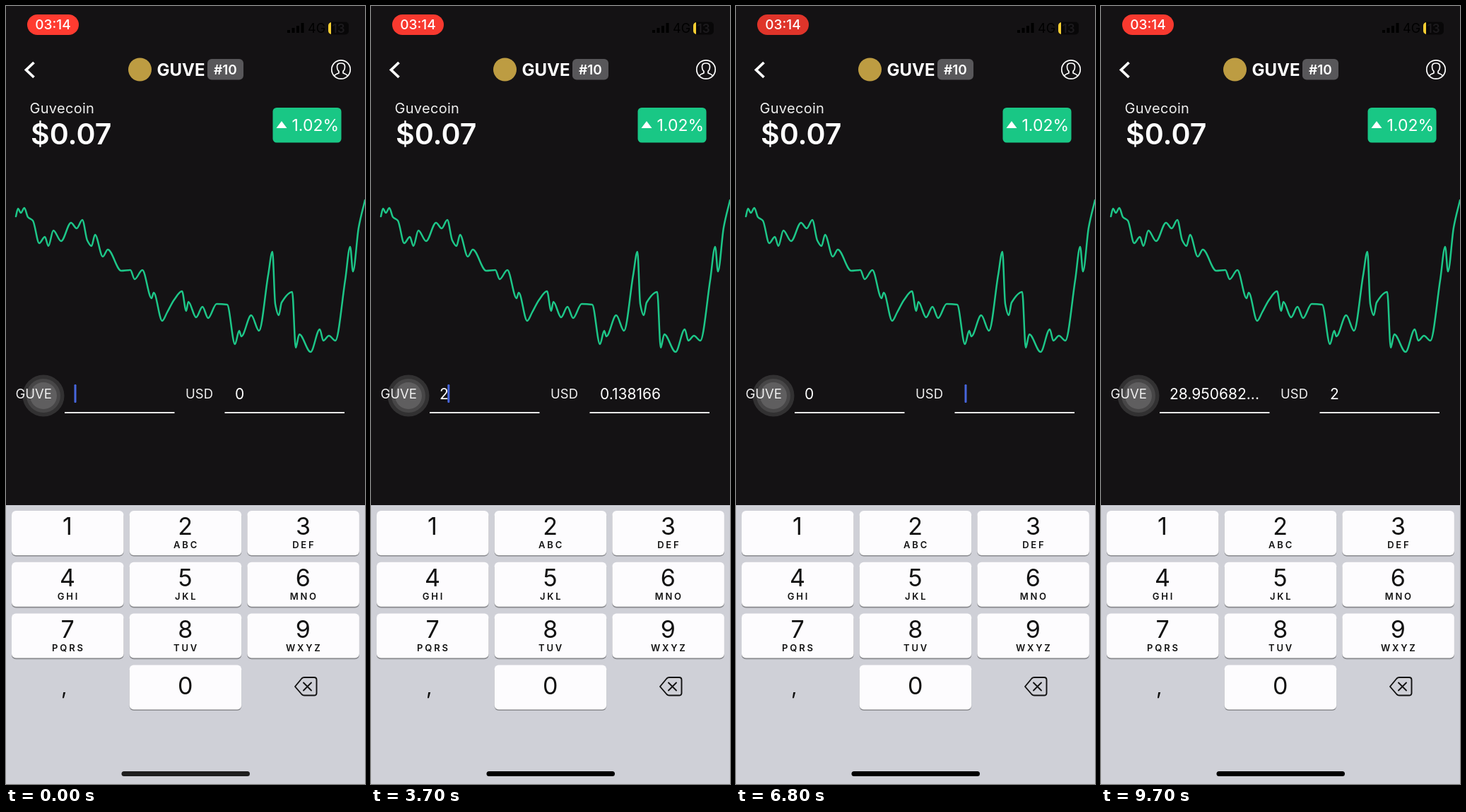
An HTML page that plays this animation: 508x1102 px, repeating every 9800 ms.

```html
<!DOCTYPE html>
<html lang="en">
<head>
<meta charset="utf-8">
<title>Coin converter</title>
<style>
  html, body { margin: 0; width: 100%; height: 100%; overflow: hidden; background: #141214; }
  svg { display: block; width: 100%; height: 100%; }
  text { font-family: Inter, Roboto, sans-serif; fill: #fff; white-space: pre; }
  .mid { text-anchor: middle; }
  .field { font-size: 21px; }
  .label { font-size: 18.5px; fill: #f0f0f0; }
  .digit { font-size: 34px; fill: #111; text-anchor: middle; }
  .letters { font-size: 13px; font-weight: 600; letter-spacing: 2.8px; fill: #111; text-anchor: middle; }
  .line { fill: none; stroke: #fff; stroke-linecap: round; stroke-linejoin: round; }
</style>
</head>
<body>
<svg viewBox="0 0 508 1102">
  <rect width="508" height="1102" fill="#141214"/>

  <g id="status">
    <rect id="pill" x="30" y="12" width="73" height="29" rx="14.5"/>
    <text class="mid" x="66.5" y="33.2" font-size="19" font-weight="500">03:14</text>
    <path d="M398 34h4v4h-4zM404.5 31h4v7h-4zM411 28h4v10h-4zM417.5 24h4v14h-4z" fill="#000"/>
    <text x="427" y="38" font-size="18" style="fill:#000">4G</text>
    <rect x="456" y="22.5" width="29" height="18" rx="5" fill="#080708"/>
    <path d="M460 23v17q-4-1-4-5v-7q0-4 4-5z" fill="#f6cf32"/>
    <text class="mid" x="470.5" y="38" font-size="17" font-weight="600" style="fill:#1c1a1d">13</text>
  </g>

  <g id="header">
    <path class="line" d="M39.5 80L28.5 90.5L39.5 101" stroke-width="3.8" style="stroke-linecap:butt;stroke-linejoin:miter"/>
    <circle cx="189.5" cy="90" r="16.5" fill="#bd9c42"/>
    <text x="213.5" y="98.5" font-size="24" font-weight="700">GUVE</text>
    <rect x="285" y="75" width="51" height="29.5" rx="6" fill="#58575a"/>
    <text class="mid" x="310.5" y="96.5" font-size="19" font-weight="600">#10</text>
    <g class="line" stroke-width="1.7">
      <circle cx="474" cy="90" r="13.2"/>
      <path d="M464.5 99q1-2 6.5-4v-2.5q-2.5-2-2.5-7q0-4.5 5.5-4.5t5.5 4.5q0 5-2.5 7v2.5q5.5 2 6.5 4"/>
    </g>
  </g>

  <g id="price">
    <text x="33.5" y="151.5" font-size="20" letter-spacing=".3" style="fill:#eee">Guvecoin</text>
    <text x="35" y="195.5" font-size="41" font-weight="600">$0.07</text>
    <rect x="377.5" y="144" width="97" height="49.5" rx="5.5" fill="#19c785"/>
    <path d="M382.5 173L390 163L397.5 173z" fill="#fff"/>
    <text x="404.5" y="177" font-size="23">1.02%</text>
  </g>

  <path id="chart" class="line" stroke-width="2.5" style="stroke:#1dc688"/>

  <g id="converter">
    <g fill="#fff">
      <circle cx="53" cy="552" r="29.5" opacity=".13"/>
      <circle cx="53" cy="552" r="24" opacity=".1"/>
      <circle cx="53" cy="552" r="19" opacity=".13"/>
    </g>
    <text class="label" x="13.5" y="556">GUVE</text>
    <text class="label" x="254" y="556">USD</text>
    <path d="M83 576H238.5M309.5 576H479" stroke="#e8e8e8" stroke-width="1.8"/>
    <text class="field" id="coin" x="97" y="557"></text>
    <text class="field" id="usd" x="324" y="557"></text>
    <rect id="caret" y="536" width="3" height="26" rx="1.2" fill="#4766dd"/>
  </g>

  <rect y="707" width="508" height="395" fill="#cfd0d7"/>
  <g id="keys"></g>
  <text x="78" y="975" font-size="30" style="fill:#111">,</text>
  <g stroke-width="1.9" stroke-linejoin="round" stroke-linecap="round">
    <path id="erase" d="M409 964L418.5 952.5Q420 951 422 951H436Q439.5 951 439.5 954.5V973Q439.5 976.5 436 976.5H422Q420 976.5 418.5 975Z" stroke="#111"/>
    <path id="eraseCross" d="M421 958.5l11 11m0-11l-11 11"/>
  </g>
  <rect id="home" x="163.5" y="1084" width="181.5" height="7" rx="3.5"/>
</svg>

<script>
const LOOP = 9800;
const $ = id => document.getElementById(id);

// Price curve: x, y of its main turning points
const prices = [
  14,298, 17,287, 21,293, 26,286, 31,299, 38,304, 47,336, 55,327, 60,340, 67,318,
  78,333, 92,307, 100,315, 108,303, 115,332, 121,340, 126,324, 137,355, 144,345, 163,375,
  176,374, 182,387, 193,374, 206,414, 209,406, 221,446, 228,434, 238,416, 249,404, 255,432,
  258,419, 269,441, 278,426, 286,442, 298,422, 313,423, 324,479, 330,460, 333,468, 347,438,
  358,460, 371,381, 377,348, 381,422, 386,438, 390,420, 405,405, 410,484, 415,465, 431,490,
  444,458, 449,474, 457,467, 466,474, 480,388, 487,341, 491,376, 499,314, 508,275
];

// Smooth curve that is level at every peak and valley
function monotonePath(flat) {
  const points = [];
  for (let i = 0; i < flat.length; i += 2) points.push([flat[i], flat[i + 1]]);
  const slopes = points.slice(1).map(([x, y], i) => (y - points[i][1]) / (x - points[i][0]));
  const tangents = points.map((_, i) => {
    const a = slopes[i - 1] ?? slopes[i], b = slopes[i] ?? a;
    return a * b > 0 ? 2 * a * b / (a + b) : 0;
  });
  return points.reduce((path, [x, y], i) => {
    if (!i) return `M${x} ${y}`;
    const [px, py] = points[i - 1], third = (x - px) / 3;
    return `${path}C${px + third} ${py + tangents[i - 1] * third} ${x - third} ${y - tangents[i] * third} ${x} ${y}`;
  }, '');
}
$('chart').setAttribute('d', monotonePath(prices));

// Number pad
const letters = ['', 'ABC', 'DEF', 'GHI', 'JKL', 'MNO', 'PQRS', 'TUV', 'WXYZ'];
function keyMarkup(digit, column, row, caption) {
  const x = 8 + column * 166.7, y = 715 + row * 72.8, cx = x + 79;
  const baseline = digit ? y + 34 : y + 41.5;
  return `<rect x="${x}" y="${y + 1.6}" width="158.5" height="63" rx="6" fill="#898a8e"/>
    <rect id="key${digit}" x="${x}" y="${y}" width="158.5" height="63" rx="6"/>
    <text class="digit" x="${cx}" y="${baseline}">${digit}</text>
    <text class="letters" x="${cx + 1.4}" y="${y + 53}">${caption}</text>`;
}
$('keys').innerHTML = letters
  .map((caption, i) => keyMarkup(i + 1, i % 3, Math.floor(i / 3), caption))
  .join('') + keyMarkup(0, 1, 3, '');

// What each tap leaves in the two fields
const steps = [
  { at: 0, coin: '', usd: '0', focus: 'coin' },
  { at: 700, coin: '1', usd: '0.069083', focus: 'coin', key: '1' },
  { at: 2600, coin: '', usd: '0', focus: 'coin', key: 'erase' },
  { at: 3300, coin: '2', usd: '0.138166', focus: 'coin', key: '2' },
  { at: 4900, coin: '', usd: '0', focus: 'coin', key: 'erase' },
  { at: 5500, coin: '', usd: '0', focus: 'usd' },
  { at: 6300, coin: '0', usd: '', focus: 'usd', key: 'erase' },
  { at: 7000, coin: '14.475341...', usd: '1', focus: 'usd', key: '1' },
  { at: 8400, coin: '0', usd: '', focus: 'usd', key: 'erase' },
  { at: 8900, coin: '28.950682...', usd: '2', focus: 'usd', key: '2' }
];
const fieldStart = { coin: 96.5, usd: 323.5 };

function setText(id, value) {
  if ($(id).textContent !== value) $(id).textContent = value;
}

function render(t) {
  const step = steps.findLast(s => s.at <= t);
  setText('coin', step.coin);
  setText('usd', step.usd);

  const width = step[step.focus] ? $(step.focus).getComputedTextLength() - 1 : 0;
  $('caret').setAttribute('x', fieldStart[step.focus] + width);
  $('caret').setAttribute('opacity', (t - step.at) % 1000 < 600 ? 1 : 0);

  const pressed = steps.find(s => s.key && t >= s.at - 100 && t < s.at + 100)?.key;
  for (let digit = 0; digit < 10; digit++) {
    $('key' + digit).setAttribute('fill', pressed === String(digit) ? '#b3b6c0' : '#fdfcfe');
  }
  const erasing = pressed === 'erase';
  $('erase').setAttribute('fill', erasing ? '#111' : 'none');
  $('eraseCross').setAttribute('stroke', erasing ? '#cfd0d7' : '#111');

  const glow = 1 - 0.07 * (1 - Math.cos(t / 1000 * Math.PI));
  $('pill').setAttribute('fill', `rgb(${[255, 59, 48].map(c => Math.round(c * glow))})`);
  const shade = Math.round(30 * Math.max(0, 1 - t / 500));
  $('home').setAttribute('fill', `rgb(${shade},${shade},${shade})`);
}

const start = performance.now();
function tick() {
  render((performance.now() - start) % LOOP);
  requestAnimationFrame(tick);
}
tick();
</script>
</body>
</html>
```
